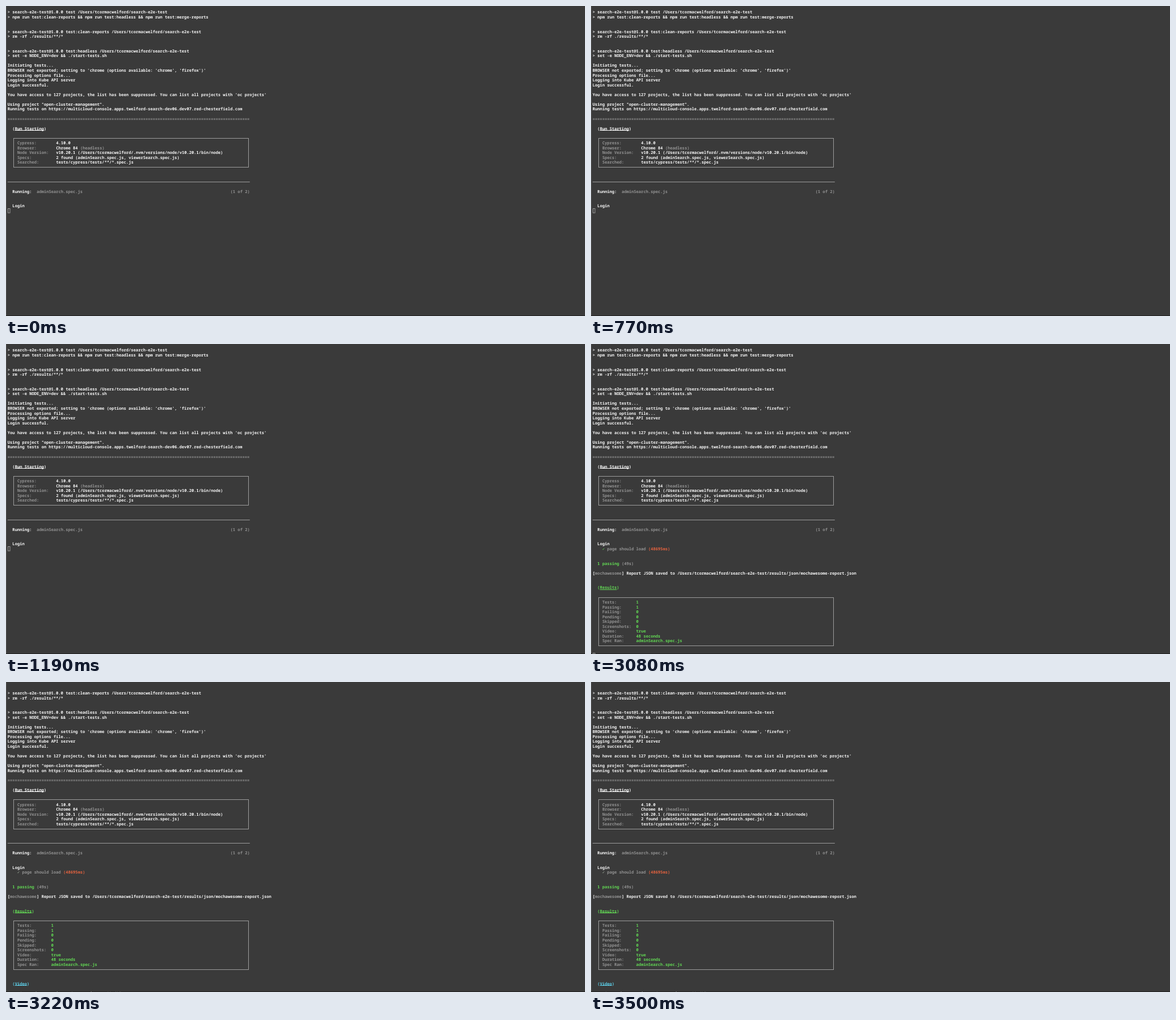
These frames come from a looping animation (1023x547 px, 3.78 s). An HTML page:

```html
<!DOCTYPE html>
<html lang="en">
<head>
<meta charset="utf-8">
<title>Terminal test run</title>
<style>
  html, body { margin: 0; width: 100%; height: 100%; overflow: hidden; background: #3a3a3a; }
  svg { display: block; width: 100%; height: 100%; }
  text {
    font: 600 7.13px "Noto Sans Mono", "DejaVu Sans Mono", monospace;
    font-variant-ligatures: none;
    text-rendering: geometricPrecision;
    white-space: pre;
  }
</style>
</head>
<body>
<svg id="stage" viewBox="0 0 1023 547">
  <rect width="1023" height="547" fill="#3a3a3a"/>
  <rect width="1" height="547" fill="#545454"/>
  <rect y="546" width="1023" height="1" fill="#202020"/>
  <g id="rows"></g>
</svg>
<script>
(() => {
  const LOOP = 3780, REPORT = 3080, SCROLL = 3220;
  const LEFT = 2.8, CELL = 4.28, BASE = 13.4, LEADING = 8.55;
  const WHITE = '#f6f6f6', GRAY = '#929292', GREEN = '#62d854', RED = '#e2623f', CYAN = '#5ccbe4';
  const LINE = '#9c9c9c';
  const home = '/Users/tcormacwelford', project = `${home}/search-e2e-test`;

  const view = document.getElementById('rows');
  let firstRow = 0; // first visible terminal row

  const colX = col => LEFT + col * CELL;
  const rowY = row => BASE + (row - firstRow) * LEADING;
  const snap = v => Math.floor(v) + 0.5;
  const midY = row => snap(rowY(row) - 2.3);
  const encode = s => s.replace(/&/g, '&amp;').replace(/</g, '&lt;');

  const put = (row, col, str, color = WHITE) =>
    `<text x="${colX(col).toFixed(2)}" y="${rowY(row).toFixed(2)}" fill="${color}">${encode(str)}</text>`;

  const stroke = (x1, x2, y, color) =>
    `<path d="M${x1} ${y}H${x2}" stroke="${color}" fill="none"/>`;

  const frame = (x, y, w, h) =>
    `<rect x="${x}" y="${y}" width="${w}" height="${h}" stroke="${LINE}" fill="none"/>`;

  // Lines of plain white text on consecutive rows
  const block = (row, lines) => lines.map((s, i) => s && put(row + i, 0, s)).join('');

  // Underlined heading in parentheses
  const heading = (row, title, color) =>
    put(row, 2, `(${title})`, color) +
    stroke(colX(3), colX(3 + title.length), snap(rowY(row) + 1), color);

  // Framed list of label and value pairs
  const table = (row, col, color, pairs) => {
    const y = midY(row);
    return frame(13.5, y, 415, midY(row + pairs.length + 1) - y) +
      pairs.map(([label, value], i) =>
        put(row + 1 + i, 4, label + ':', GRAY) + put(row + 1 + i, col, value, color)).join('');
  };

  const cursor = row => frame(3.5, snap(rowY(row) - 6.6), 3.5, 7.5);

  const intro = () =>
    block(0, [
      `> search-e2e-test@1.0.0 test ${project}`,
      '> npm run test:clean-reports && npm run test:headless && npm run test:merge-reports',
      '', '',
      `> search-e2e-test@1.0.0 test:clean-reports ${project}`,
      '> rm -rf ./results/**/*',
      '', '',
      `> search-e2e-test@1.0.0 test:headless ${project}`,
      '> set -e NODE_ENV=dev && ./start-tests.sh',
      '',
      'Initiating tests...',
      "BROWSER not exported; setting to 'chrome (options available: 'chrome', 'firefox')'",
      'Processing options file...',
      'Logging into Kube API server',
      'Login successful.',
      '',
      "You have access to 127 projects, the list has been suppressed. You can list all projects with 'oc projects'",
      '',
      'Using project "open-cluster-management".',
      'Running tests on https://multicloud-console.apps.twelford-search-dev06.dev07.red-chesterfield.com'
    ]) +
    put(22, 0, '='.repeat(100), GRAY) +
    heading(24, 'Run Starting', WHITE) +
    table(26, 20, WHITE, [
      ['Cypress', '4.10.0'],
      ['Browser', 'Chrome 84'],
      ['Node Version', `v10.20.1 (${home}/.nvm/versions/node/v10.20.1/bin/node)`],
      ['Specs', '2 found (adminSearch.spec.js, viewerSearch.spec.js)'],
      ['Searched', 'tests/cypress/tests/**/*.spec.js']
    ]) +
    put(28, 30, '(headless)', GRAY) +
    stroke(colX(0), colX(100), midY(35), LINE) +
    put(37, 2, 'Running:') + put(37, 12, 'adminSearch.spec.js', GRAY) + put(37, 92, '(1 of 2)', GRAY) +
    put(40, 2, 'Login');

  const report = () =>
    put(41, 4, '✓', firstRow ? '#a9b8a6' : GREEN) +
    put(41, 6, 'page should load', GRAY) + put(41, 23, '(48695ms)', RED) +
    put(44, 2, '1 passing', GREEN) + put(44, 12, '(49s)', GRAY) +
    put(46, 0, '[') + put(46, 1, 'mochawesome', GRAY) +
    put(46, 12, `] Report JSON saved to ${project}/results/json/mochawesome-report.json`) +
    heading(49, 'Results', GREEN) +
    table(51, 18, GREEN, [
      ['Tests', '1'], ['Passing', '1'], ['Failing', '0'], ['Pending', '0'], ['Skipped', '0'],
      ['Screenshots', '0'], ['Video', 'true'], ['Duration', '48 seconds'], ['Spec Ran', 'adminSearch.spec.js']
    ]);

  const video = () =>
    heading(64, 'Video', CYAN) +
    put(66, 2, '-  Started processing:  Compressing to 32 CRF');

  const stages = [
    () => intro() + cursor(41),
    () => intro() + report() + cursor(63),
    () => intro() + report() + video()
  ];

  let shown = -1;
  function render(t) {
    const stage = t < REPORT ? 0 : t < SCROLL ? 1 : 2;
    if (stage === shown) return;
    shown = stage;
    firstRow = stage === 2 ? 3 : 0;
    view.innerHTML = stages[stage]();
  }

  const began = performance.now();
  function tick() {
    render((performance.now() - began) % LOOP);
    requestAnimationFrame(tick);
  }
  tick();
})();
</script>
</body>
</html>
```
